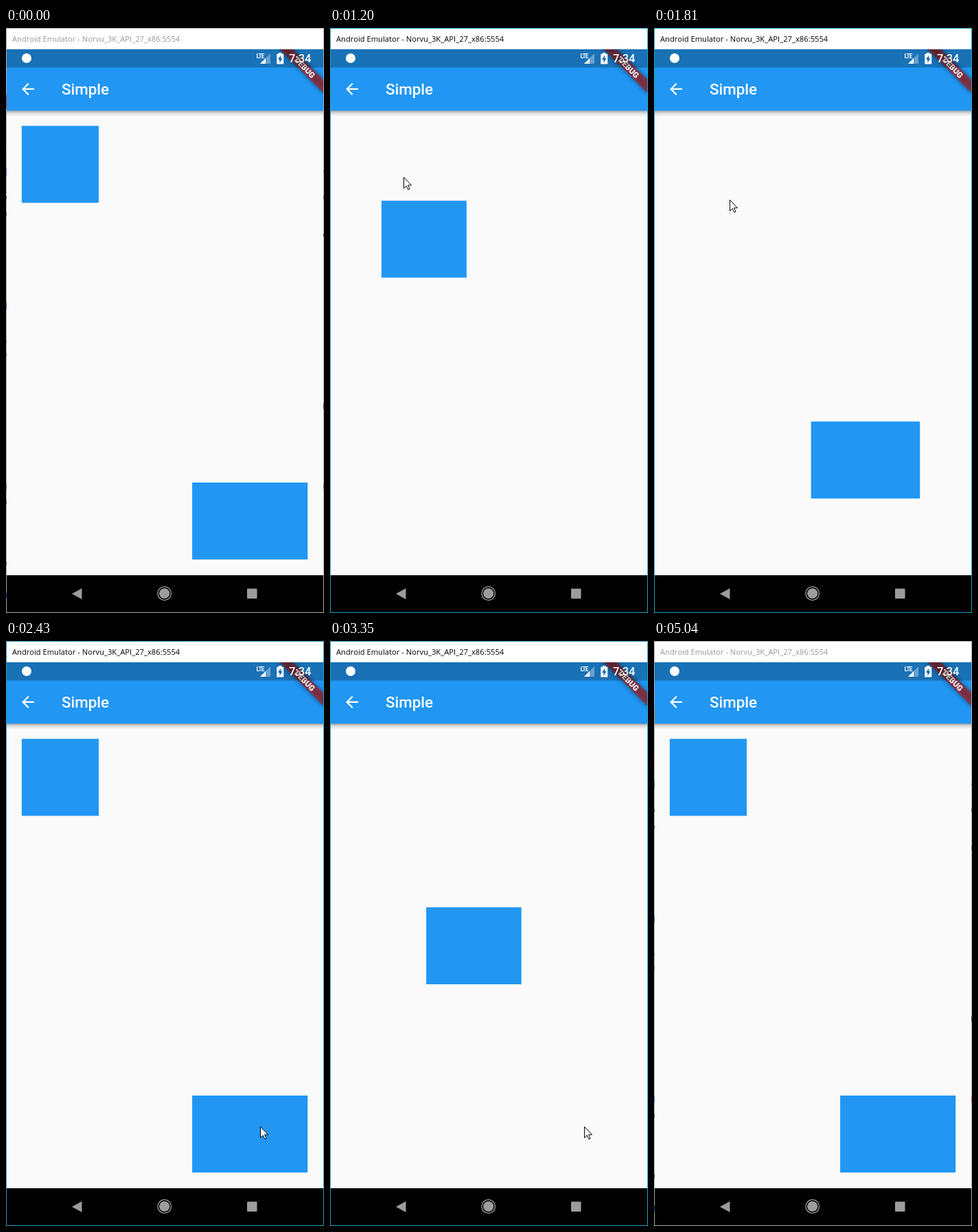
An HTML page that plays this animation: 463 px wide and 852 px high, repeating every 5120 ms.

```html
<!DOCTYPE html>
<html lang="en">
<head>
<meta charset="utf-8">
<title>Simple</title>
<style>
  html, body { margin: 0; width: 100%; height: 100%; overflow: hidden; background: #fff; }
  svg { display: block; width: 463px; height: 852px; }
  text { font-family: Roboto, sans-serif; fill: #fff; }
  #caption { font: 11.2px "Open Sans", sans-serif; }
</style>
</head>
<body>
<svg viewBox="0 0 463 852" xmlns="http://www.w3.org/2000/svg">
  <defs>
    <clipPath id="screen"><rect x="1" y="31" width="461" height="820"/></clipPath>
    <linearGradient id="shade" x2="0" y2="1">
      <stop offset="0" stop-color="#000" stop-opacity=".36"/>
      <stop offset=".45" stop-color="#000" stop-opacity=".12"/>
      <stop offset="1" stop-color="#000" stop-opacity="0"/>
    </linearGradient>
    <filter id="blur" x="-20%" y="-150%" width="140%" height="400%"><feGaussianBlur stdDeviation="3.5"/></filter>
  </defs>

  <rect width="463" height="852" fill="#fff"/>
  <text id="caption" x="9" y="20">Android Emulator - Norvu_3K_API_27_x86:5554</text>

  <g clip-path="url(#screen)">
    <rect x="1" y="31" width="461" height="767" fill="#fafafa"/>
    <g id="boxes" fill="#2196f3"></g>

    <!-- app bar -->
    <rect x="1" y="120" width="461" height="9" fill="url(#shade)"/>
    <rect x="1" y="31" width="461" height="89.4" fill="#2196f3"/>
    <path transform="translate(18.6 75.5) scale(1.1206)" fill="#fff"
      d="M20 11H7.83l5.59-5.59L12 4l-8 8 8 8 1.41-1.41L7.83 13H20z"/>
    <text x="81" y="97.4" font-size="22.4" font-weight="500">Simple</text>

    <!-- debug ribbon -->
    <g transform="translate(462 31) scale(1.1206) rotate(45)">
      <rect x="-40" y="28" width="80" height="12" opacity=".5" filter="url(#blur)"/>
      <rect x="-40" y="28" width="80" height="12" fill="#b71c1c" fill-opacity=".627"/>
      <text y="37.6" font-size="10.2" font-weight="900" text-anchor="middle">DEBUG</text>
    </g>

    <!-- status bar -->
    <rect x="1" y="31" width="461" height="26.6" fill-opacity=".25"/>
    <circle cx="30" cy="44" r="7" fill="#fff"/>
    <text x="364.6" y="43.6" font-size="8.4" font-weight="700" letter-spacing="-.8">LTE</text>
    <path d="M385 37V52H370z" fill="#fff" fill-opacity=".35"/>
    <path d="M378 44V52H370z" fill="#fff"/>
    <path d="M397 36h4.4v1.8h2.8V52.4h-10V37.800h2.800z" fill="#fff"/>
    <path d="M400.200 39.600v4.400h2.400l-4.300 7v-5h-2.500z" fill="#1970b6"/>
    <text x="412" y="50.4" font-size="16.4" font-weight="500">7:34</text>

    <!-- navigation bar -->
    <rect x="1" y="797" width="461" height="54"/>
    <g fill="#9c9c9c">
      <path d="M96 824L110.500 816V832z"/>
      <circle cx="230.700" cy="823.500" r="7.600"/>
      <circle cx="230.700" cy="823.500" r="9.800" fill="none" stroke="#9c9c9c" stroke-width="1.300"/>
      <rect x="351" y="816.500" width="14.500" height="14.500" rx=".8"/>
    </g>
  </g>

  <rect id="frame" x=".5" y=".5" width="462" height="851" fill="none"/>
  <g id="specks"></g>
  <path id="cursor" fill="#fff" stroke="#000" stroke-width="1"
    d="M.5 .5V16.500L4.200 13L6.900 18.500L9 17.600L6.500 12H11.500z"/>
</svg>
<script>
const LOOP = 5120;
const $ = id => document.getElementById(id);
const mix = (a, b, p) => a + (b - a) * p;

function addRect(parent, x, y, width, height, fill) {
  const el = document.createElementNS("http://www.w3.org/2000/svg", "rect");
  parent.append(el);
  setRect(el, { x, y, width, height });
  if (fill) el.setAttribute("fill", fill);
  return el;
}
function setRect(el, attrs) {
  for (const key in attrs) el.setAttribute(key, attrs[key]);
}
const show = (el, on) => el.setAttribute("visibility", on ? "visible" : "hidden");

const SIZE = 112.1;
const from = { x: 22.9, y: 142.5, width: SIZE };
const to = { x: 271.1, y: 662, width: 168.1 };
const [first, second, flyer] = [from, to, from].map(b => addRect($("boxes"), b.x, b.y, b.width, SIZE));

// Bits of the desktop showing through the edge of the unfocused window
const patch = addRect($("specks"), 0, 97, 1, 20);
[[0, 170, 7, "#e8a0a0"], [0, 204, 11, "#4a6fb5"], [0, 245, 4, "#444"], [0, 269, 4, "#444"],
 [0, 400, 10, "#4a5fb5"], [0, 455, 3, "#4a5fb5"], [0, 474, 4, "#4a5fb5"], [0, 663, 9, "#3a78b0"],
 [0, 688, 6, "#555"], [0, 777, 5, "#444"], [0, 822, 9, "#33489a"],
 [462, 207, 3, "#555"], [462, 244, 5, "#555"], [462, 299, 5, "#444"],
 [462, 546, 9, "#444"], [462, 663, 9, "#a05060"]
].forEach(([x, y, h, fill]) => addRect($("specks"), x, y, 1, h, fill));

// Pointer track: tick, x, y
const track = [
  [-14, 240, 745], [-13, 190, 665], [-12, 134, 525], [-11, 117, 453], [-10, 107, 385],
  [-8, 107, 262], [-7, 107, 238], [-5, 107, 217], [8, 107, 217], [10, 110, 250],
  [11, 115, 350], [13, 136, 587], [14, 200, 630], [15, 270, 668], [16, 330, 692],
  [18, 370, 707], [38, 370, 707], [39, 358, 738], [40, 334, 787]
];

function pointerAt(n) {
  const i = track.findIndex(k => k[0] >= n);
  const b = track[i], a = track[Math.max(0, i - 1)];
  const p = b[0] === a[0] ? 0 : (n - a[0]) / (b[0] - a[0]);
  return [mix(a[1], b[1], p), mix(a[2], b[2], p)];
}

function tickAt(t) {
  return t < 1042 ? Math.min(-1, Math.floor((t - 66) / 73) - 14) : Math.floor((t - 1042) / 76.7);
}

function flightAt(n) {
  if (n >= 0 && n < 13) return 0.055 + 0.0774 * n;
  if (n >= 24 && n < 36) return 0.936 - 0.0773 * (n - 24);
  return null;
}

function draw(t) {
  const n = tickAt(t);

  const p = flightAt(n), flying = p !== null;
  show(first, !flying);
  show(second, !flying);
  show(flyer, flying);
  if (flying) setRect(flyer, {
    x: mix(from.x, to.x, p), y: mix(from.y, to.y, p), width: mix(from.width, to.width, p)
  });

  const active = n >= -3 && n < 52;
  $("caption").style.fill = active ? "#000" : "#999";
  $("frame").setAttribute("stroke", active ? "#18a0ba" : "#aaa");
  show($("specks"), !active);
  patch.setAttribute("fill", n < 0 ? "#c03040" : "#e08a30");

  const pointing = n >= -14 && n <= 40;
  show($("cursor"), pointing);
  if (pointing) {
    const [x, y] = pointerAt(n).map(Math.round);
    $("cursor").setAttribute("transform", `translate(${x} ${y})`);
  }
}

const start = performance.now();
function loop() {
  draw((performance.now() - start) % LOOP);
  requestAnimationFrame(loop);
}
loop();
</script>
</body>
</html>
```
